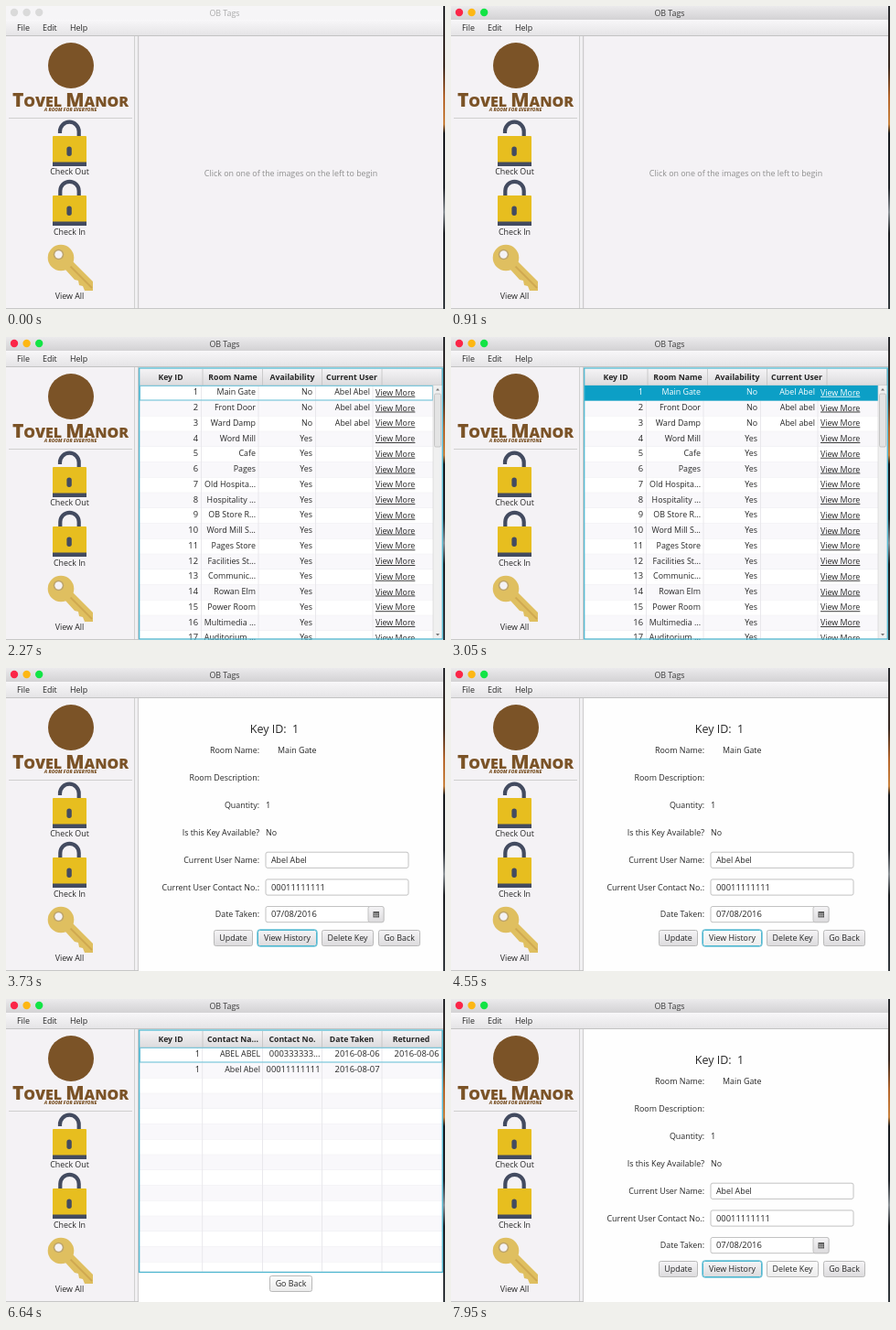
Write an HTML page that moves like this. It is 480x331 px and loops after 8 s.

```html
<!DOCTYPE html>
<html lang="en">
<head>
<meta charset="utf-8">
<title>OB Tags</title>
<style>
html, body { margin: 0; width: 100%; height: 100%; overflow: hidden; background: #222; }
svg { display: block; width: 100vw; height: 100vh; }
text { font: 8.9px "Open Sans", "Noto Sans", sans-serif; fill: #262626; white-space: pre; }
.b { font-weight: 700; font-size: 8.7px; }
.num { font-size: 9.4px; }
.brand { font-weight: 800; fill: #7b5327; }
</style>
</head>
<body>
<svg viewBox="0 0 480 331" preserveAspectRatio="none">
  <defs>
    <linearGradient id="bar" x2="0" y2="1"><stop stop-color="#ebeaec"/><stop offset="1" stop-color="#d3d2d4"/></linearGradient>
    <linearGradient id="soft" x2="0" y2="1"><stop stop-color="#f8f7f9"/><stop offset="1" stop-color="#e5e4e6"/></linearGradient>
    <linearGradient id="btn" x2="0" y2="1"><stop stop-color="#f5f4f6"/><stop offset="1" stop-color="#dcdbdd"/></linearGradient>
    <linearGradient id="hover" x2="0" y2="1"><stop stop-color="#fcfcfc"/><stop offset="1" stop-color="#ececec"/></linearGradient>
    <linearGradient id="desk" x2="0" y2="1">
      <stop stop-color="#26282d"/><stop offset=".2" stop-color="#3a2a22"/><stop offset=".3" stop-color="#b5652b"/>
      <stop offset=".39" stop-color="#c9833f"/><stop offset=".42" stop-color="#17191d"/><stop offset=".6" stop-color="#20242a"/>
      <stop offset=".68" stop-color="#8d9398"/><stop offset=".75" stop-color="#1b1e22"/><stop offset="1" stop-color="#33383d"/>
    </linearGradient>
  </defs>
  <g id="stage"></g>
</svg>
<script>
const stage = document.getElementById('stage');
const BLUE = '#4fb7d0', FOCUS = '#7cc8dd', INK = '#262626', LINE = '#e9e8ec', PANEL = '#f4f2f5';

function add(parent, tag, attrs = {}, content) {
  const node = document.createElementNS('http://www.w3.org/2000/svg', tag);
  for (const key in attrs) node.setAttribute(key, attrs[key]);
  if (content !== undefined) node.textContent = content;
  parent.append(node);
  return node;
}
const group = (parent = stage) => add(parent, 'g');
const rect = (g, x, y, width, height, fill, more) => add(g, 'rect', { x, y, width, height, fill, ...more });
const path = (g, d, stroke, width = 1, fill = 'none') => add(g, 'path', { d, stroke, 'stroke-width': width, fill });
const disc = (g, cx, cy, r, fill) => add(g, 'circle', { cx, cy, r, fill });
const text = (g, x, y, value, anchor = 'start', more) =>
  add(g, 'text', { x, y, 'text-anchor': anchor, ...more }, value);
const numeric = value => /^\d/.test(value) ? { class: 'num' } : {};

function button(g, x, y, width, label, focused) {
  const box = rect(g, x + .5, y + .5, width - 1, 17, 'url(#btn)', { rx: 2, stroke: focused ? BLUE : '#b9b9b9' });
  if (focused) rect(g, x - .3, y - .3, width + .6, 18.6, 'none', { rx: 3, stroke: BLUE, 'stroke-width': .8 });
  text(g, x + width / 2, y + 12.3, label, 'middle');
  return box;
}

// Window frame
rect(stage, 0, 0, 480, 331, 'url(#desk)');
rect(stage, 0, 0, 478, 331, PANEL);
function titleBar(fill, ink, lights) {
  const g = group();
  rect(g, 0, 0, 478, 15, fill);
  lights.forEach((color, i) => disc(g, 9 + 13.6 * i, 7, 4.2, color));
  text(g, 239, 10.6, 'OB Tags', 'middle', { style: `fill:${ink}` });
  return g;
}
const idleBar = titleBar('#f6f5f7', '#aaa', ['#dadada', '#dadada', '#dadada']);
const activeBar = titleBar('url(#bar)', '#3c3c3c', ['#fb2648', '#fdb713', '#12e445']);
rect(stage, 0, 15, 478, 17, 'url(#soft)');
path(stage, 'M0 32.5H478', '#c3c3c3');
['File', 'Edit', 'Help'].forEach((label, i) => text(stage, [12, 40, 70][i], 27, label));

// Sidebar
function padlock(y, shackle) {
  path(stage, shackle, '#434b60', 4.2);
  rect(stage, 51, y, 37, 33, '#e7be1f', { rx: 1 });
  rect(stage, 51, y + 28.5, 37, 4.5, '#434b60');
  rect(stage, 66.4, y + 11.5, 5.4, 10.5, '#434b60', { rx: 2.7 });
}
disc(stage, 71, 65, 25, '#7b5327');
const brand = text(stage, 70.5, 110, '', 'middle', { class: 'brand' });
[['T', 21], ['OVEL ', 16], ['M', 21], ['ANOR', 16]].forEach(([part, size]) =>
  add(brand, 'tspan', { style: `font-size:${size}px` }, part));
text(stage, 70.5, 114.5, 'A ROOM FOR EVERYONE', 'middle', { class: 'brand', style: 'font-size:5px;font-style:italic' });
path(stage, 'M3 122.5H138', '#cfcfcf');
padlock(142, 'M59 139V137A10.3 10.3 0 0 1 79.7 137V143');
padlock(207, 'M59.3 208V202A10.2 10.2 0 0 1 79.7 202V208');
path(stage, 'M65 288L73 279L95 301V311H86L84 306L80 305L79 300L75 299Z', 'none', 0, '#dfbf60');
path(stage, 'M69 283L94 308', '#cfa850', 1.8);
disc(stage, 60, 275, 14.3, '#dfbf60');
disc(stage, 57.5, 271.5, 5.8, '#bda46a');
disc(stage, 57.5, 271.5, 4.2, PANEL);
text(stage, 69.5, 184, 'Check Out', 'middle');
text(stage, 69.5, 250, 'Check In', 'middle');
text(stage, 69.5, 320, 'View All', 'middle');
rect(stage, 140, 33, 5, 298, '#f1f0f2');
path(stage, 'M140.5 33V331', '#d0d0d0');
path(stage, 'M144.7 33V331M0 330.6H478', '#c3c3c3');

// Welcome
const welcome = group();
text(welcome, 311.5, 186, 'Click on one of the images on the left to begin', 'middle', { style: 'fill:#8e8e8e' });

// Tables
const PITCH = 16.75, rowTop = i => 53 + PITCH * i;
const baseline = i => 63.3 + PITCH * i;

function table(headers, lines, right, bottom) {
  const g = group();
  rect(g, 145, 33, 333, 298, '#fff');
  for (let i = 0; rowTop(i) < bottom; i++) {
    const h = Math.min(PITCH, bottom - rowTop(i));
    rect(g, 146, rowTop(i), right - 146, h, i % 2 ? '#f9f8fb' : '#fff');
    path(g, `M146 ${rowTop(i) + h}H${right}`, LINE, .7);
  }
  lines.forEach(x => path(g, `M${x} 53V${bottom}`, LINE));
  rect(g, 146, 34.5, 331, 18.5, 'url(#btn)');
  path(g, 'M146 53H477', '#c4c4c4', .8);
  [215, 280.5, 345.5, 411, 476.5].forEach(x => path(g, `M${x} 35V53`, '#c2c2c2', .8));
  headers.forEach((label, i) => text(g, [180, 248, 313, 378, 443][i], 47, label, 'middle', { class: 'b' }));
  return g;
}
function cells(g, i, values, ends, ink = INK) {
  values.forEach((value, c) =>
    text(g, ends[c], baseline(i), value, 'end', { style: `fill:${ink}`, ...numeric(value) }));
}
const border = (g, bottom) => rect(g, 145.7, 34, 331.6, bottom - 34, 'none', { stroke: BLUE, 'stroke-width': 1.3 });
const focusRow = (g, right) =>
  rect(g, 146.5, 53.4, right - 147, 15.6, 'none', { stroke: FOCUS, 'stroke-width': 1.2 });

const rooms = ['Main Gate', 'Front Door', 'Ward Damp', 'Word Mill', 'Cafe', 'Pages', 'Old Hospita...', 'Hospitality ...',
  'OB Store R...', 'Word Mill S...', 'Pages Store', 'Facilities St...', 'Communic...', 'Rowan Elm', 'Power Room',
  'Multimedia ...', 'Auditorium ...'];
const holders = ['Abel Abel', 'Abel abel', 'Abel abel'];
const listEnds = [210, 273, 335, 398];
const list = table(['Key ID', 'Room Name', 'Availability', 'Current User'], [213.5, 276, 338.5, 401], 467, 330);

function roomRow(g, i, ink) {
  cells(g, i, [i + 1, rooms[i], holders[i] ? 'No' : 'Yes', holders[i] || ''], listEnds, ink);
  text(g, 404, baseline(i) + .5, 'View More', 'start', { style: `fill:${ink};text-decoration:underline` });
}
rooms.forEach((_, i) => roomRow(list, i, INK));
focusRow(list, 467);
const selected = group(list);
rect(selected, 146, 53, 321, 16.5, '#0c9fc6');
roomRow(selected, 0, '#fff');
rect(list, 467, 53, 10, 277, '#f0f0f0');
path(list, 'M467 53V330', '#d4d4d4', .7);
rect(list, 468.5, 62, 7, 58, '#e4e4e4', { rx: 1.5, stroke: '#bdbdbd', 'stroke-width': .8 });
path(list, 'M470 58.5L472 56L474 58.5ZM470 324L472 326.5L474 324Z', 'none', 0, '#777');
border(list, 330);

const log = table(['Key ID', 'Contact Na...', 'Contact No.', 'Date Taken', 'Returned'], [214.7, 280.5, 345.5, 411], 477, 298);
const logEnds = [212, 278, 343.5, 408.5, 473.5];
cells(log, 0, [1, 'ABEL ABEL', '000333333...', '2016-08-06', '2016-08-06'], logEnds);
cells(log, 1, [1, 'Abel Abel', '00011111111', '2016-08-07'], logEnds);
focusRow(log, 477);
border(log, 298.5);
const logBack = button(log, 288, 302, 47, 'Go Back');

// Key details
const detail = group();
rect(detail, 145, 33, 333, 298, '#fefefe');
text(detail, 293.5, 71, 'Key ID:  1', 'middle', { style: 'font-size:12.5px' });
[['Room Name:', 93, 'Main Gate', 297], ['Room Description:', 123, '', 284], ['Quantity:', 153, '1', 284],
 ['Is this Key Available?', 183.3, 'No', 284], ['Current User Name:', 213, 'Abel Abel', 290, 156],
 ['Current User Contact No.:', 242.7, '00011111111', 290, 156], ['Date Taken:', 272.3, '07/08/2016', 290, 129]
].forEach(([label, y, value, x, width]) => {
  text(detail, 277, y, label, 'end');
  if (width) rect(detail, 284, y - 11.8, width, 17.2, '#fff', { rx: 2, stroke: '#c2c2c2' });
  text(detail, x, y, value, 'start', numeric(value));
});
rect(detail, 396, 260.5, 17, 17.2, 'url(#btn)', { rx: 2, stroke: '#c2c2c2' });
rect(detail, 401.5, 266, 6.5, 6.5, '#555');
path(detail, 'M402 268.2H407.5M402 270.4H407.5M403.6 268V272.5M405.8 268V272.5', '#ddd', .5);
button(detail, 227, 286, 43, 'Update');
const history = button(detail, 275, 286, 65, 'View History', true);
const remove = button(detail, 345, 286, 57, 'Delete Key');
button(detail, 407, 286, 46, 'Go Back');

// Timeline: [start, view]
const LOOP = 8000;
const views = { welcome, list, detail, log };
const steps = [[0, 'welcome'], [1200, 'list'], [3700, 'detail'], [5150, 'log'], [7300, 'detail']];
const show = (node, on) => node.setAttribute('display', on ? 'inline' : 'none');
const hover = (node, on) => node.setAttribute('fill', on ? 'url(#hover)' : 'url(#btn)');

function draw() {
  const t = performance.now() % LOOP;
  const view = steps.filter(([start]) => t >= start).pop()[1];
  for (const name in views) show(views[name], name === view);
  show(idleBar, t < 900);
  show(activeBar, t >= 900);
  show(selected, t >= 2650);
  hover(history, t >= 4300 && t < 5150);
  hover(logBack, t >= 6300);
  hover(remove, t >= 7700);
  requestAnimationFrame(draw);
}
draw();
</script>
</body>
</html>
```
